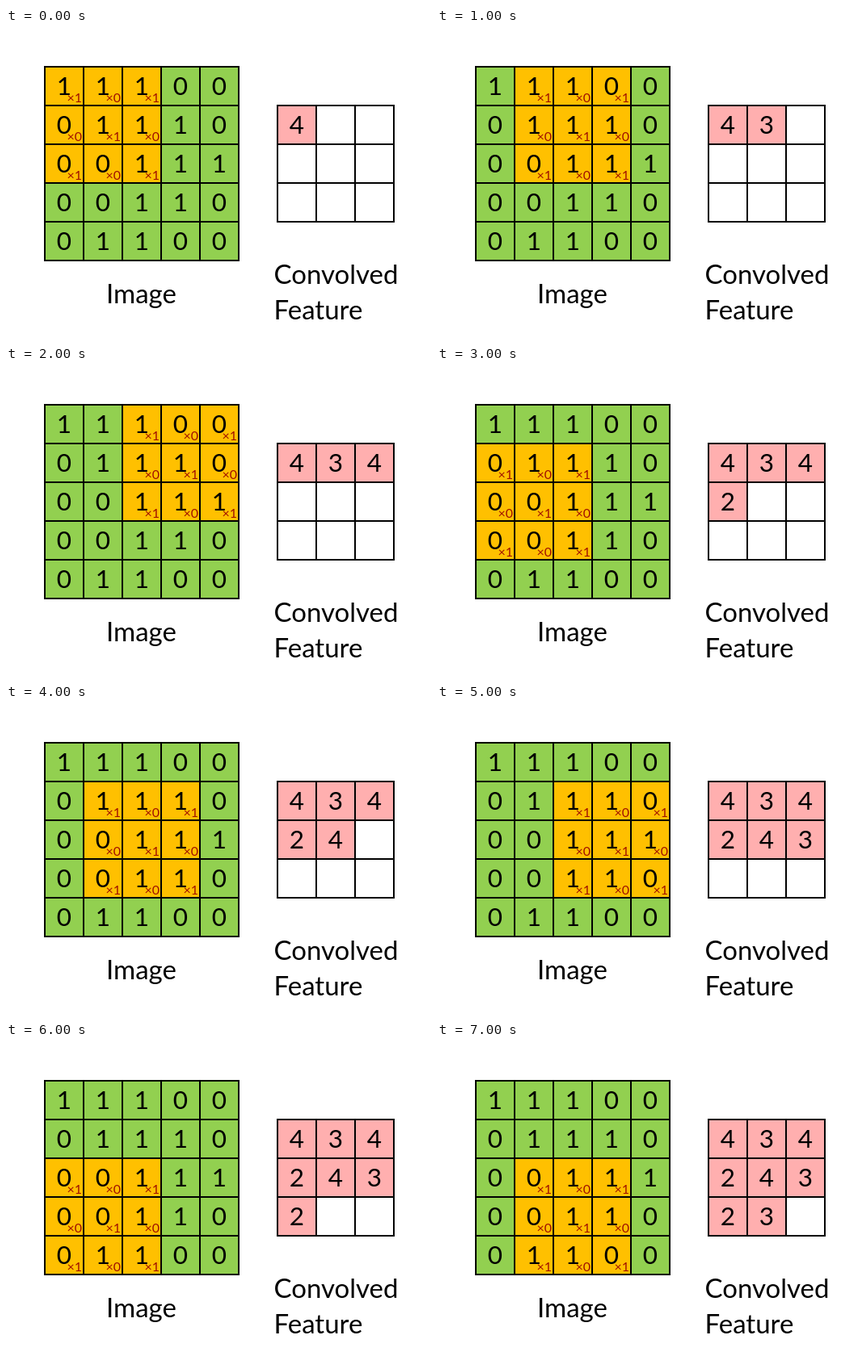
An HTML page with a canvas for the animation above (8 s loop, 526x384 px).

```html
<!DOCTYPE html>
<html lang="en">
<head>
<meta charset="utf-8">
<title>Convolution</title>
<style>
  html, body { margin: 0; width: 100%; height: 100%; overflow: hidden; background: #fff; }
  canvas { display: block; }
</style>
</head>
<body>
<canvas id="stage" width="526" height="384"></canvas>
<script>
const ctx = document.getElementById('stage').getContext('2d');
const CELL = 48, STEP_MS = 1000, STEPS = 8;
const GREEN = '#92d050', ORANGE = '#ffc000', PINK = '#ffafaf', RED = '#a01000';
const image = ['11100', '01110', '00111', '00110', '01100'];
const kernel = ['101', '010', '101'];

function text(str, x, y, size, align = 'left', color = '#000') {
  ctx.font = `${size}px Lato, Carlito, sans-serif`;
  ctx.textAlign = align;
  ctx.fillStyle = color;
  ctx.fillText(str, x, y);
}

function drawGrid(left, top, count, fillOf, labelOf) {
  for (let row = 0; row < count; row++) {
    for (let col = 0; col < count; col++) {
      const x = left + col * CELL, y = top + row * CELL;
      ctx.fillStyle = fillOf(row, col);
      ctx.fillRect(x, y, CELL, CELL);
      text(labelOf(row, col), x + 24, y + 34.5, 31.5, 'center');
    }
  }
  const span = count * CELL;
  ctx.fillStyle = '#000';
  for (let i = 0; i <= count; i++) {
    ctx.fillRect(left + i * CELL - 1, top - 1, 2, span + 2);
    ctx.fillRect(left - 1, top + i * CELL - 1, span + 2, 2);
  }
}

function convolve(row, col) {
  let sum = 0;
  for (let r = 0; r < 3; r++)
    for (let c = 0; c < 3; c++) sum += image[row + r][col + c] * kernel[r][c];
  return sum;
}

function draw(step) {
  const top = Math.floor(step / 3), left = step % 3;
  const inWindow = (r, c) => r >= top && r < top + 3 && c >= left && c < left + 3;
  const done = (r, c) => r * 3 + c <= step;

  ctx.fillStyle = '#fff';
  ctx.fillRect(0, 0, 526, 384);

  drawGrid(48, 48, 5, (r, c) => inWindow(r, c) ? ORANGE : GREEN, (r, c) => image[r][c]);
  for (let r = 0; r < 3; r++)
    for (let c = 0; c < 3; c++)
      text('×' + kernel[r][c], 94 + (left + c) * CELL, 92 + (top + r) * CELL, 16, 'right', RED);

  drawGrid(336, 96, 3, (r, c) => done(r, c) ? PINK : '#fff', (r, c) => done(r, c) ? convolve(r, c) : '');

  text('Image', 167.5, 341, 33, 'center');
  text('Convolved', 331.5, 317, 33);
  text('Feature', 331.5, 361, 33);
}

const start = performance.now();
function tick(now) {
  draw(Math.floor(Math.max(0, now - start) / STEP_MS) % STEPS);
  requestAnimationFrame(tick);
}
draw(0);
requestAnimationFrame(tick);
</script>
</body>
</html>
```
